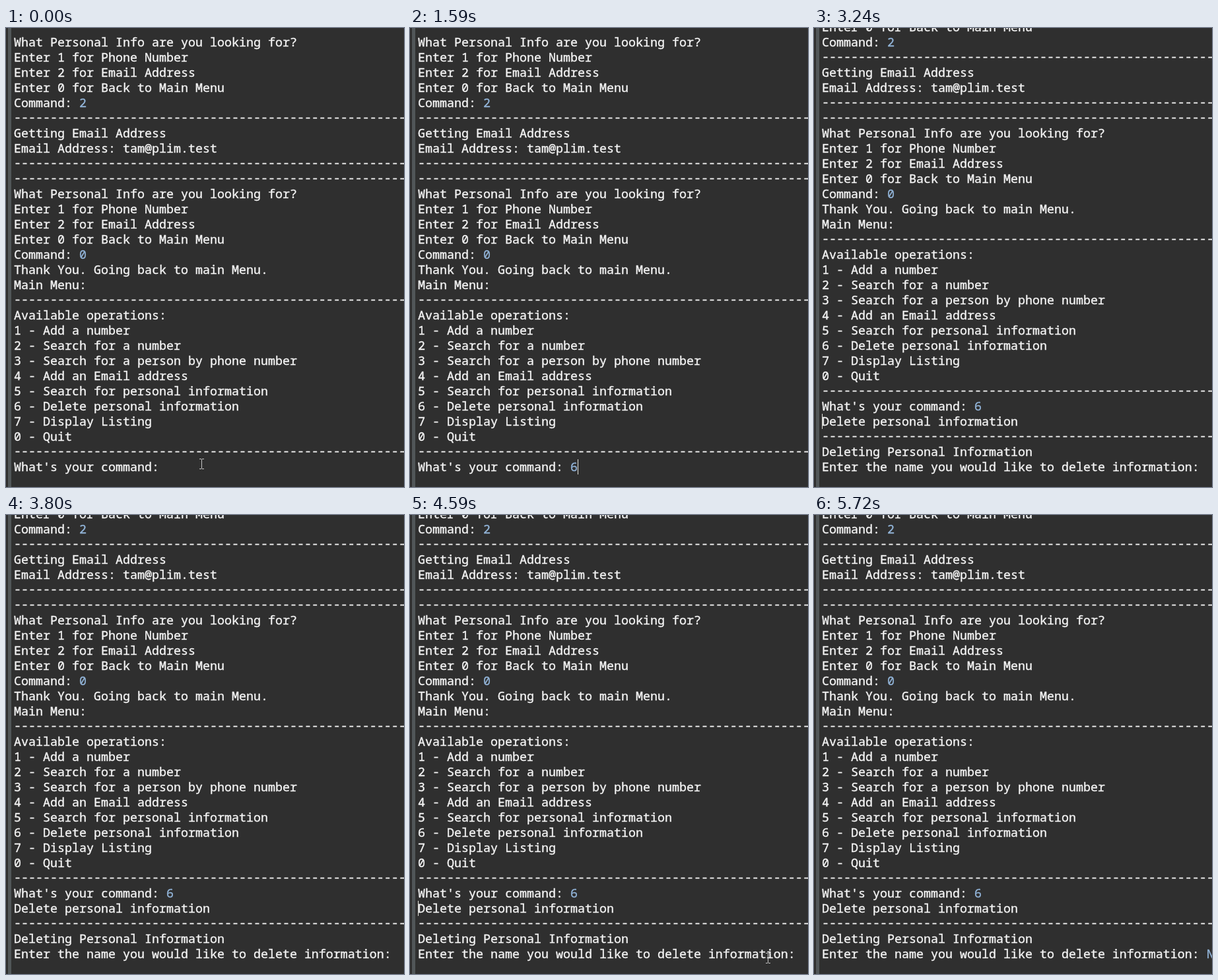
These frames come from a looping animation (603x696 px, 8000 ms). An HTML page with a canvas:

```html
<!DOCTYPE html>
<html lang="en">
<head>
<meta charset="utf-8">
<title>Console session</title>
<style>
  html, body { margin: 0; width: 603px; height: 696px; overflow: hidden; background: #2f2f2f; }
  canvas { display: block; }
</style>
</head>
<body>
<canvas id="stage" width="603" height="696"></canvas>
<script>
const LOOP = 8000, BLINK = 540, STEP = 120;
const TYPED = 510, REPLIED = 2160, POINTED = 4050, GLIDE = 4200, CLICKED = 4870, NAMED = 5720;

const LEFT = 12, TOP = 10, ROW = 23, CHAR = 11, BASELINE = 18, LAST_ROW = 28;
const TEXT = '#f4f4f4', INPUT = '#92b4d8', CARET = '#e4e4dc', POINTER = '#c4c4c4';
const RULE = '-'.repeat(56);
const COMMAND = 'What\'s your command: ';
const NAME = 'Enter the name you would like to delete information:';

const ctx = document.getElementById('stage').getContext('2d');

const infoMenu = answer => [
  'What Personal Info are you looking for?',
  'Enter 1 for Phone Number',
  'Enter 2 for Email Address',
  'Enter 0 for Back to Main Menu',
  ['Command: ', answer],
];

const operations = [
  'Add a number',
  'Search for a number',
  'Search for a person by phone number',
  'Add an Email address',
  'Search for personal information',
  'Delete personal information',
  'Display Listing',
  'Quit',
];

const history = [
  ...infoMenu('2'),
  RULE,
  'Getting Email Address',
  'Email Address: tam@plim.test',
  RULE,
  RULE,
  ...infoMenu('0'),
  'Thank You. Going back to main Menu.',
  'Main Menu:',
  RULE,
  'Available operations:',
  ...operations.map((name, i) => `${(i + 1) % operations.length} - ${name}`),
  RULE,
];

const reply = ['Delete personal information', RULE, 'Deleting Personal Information'];

const mix = (a, b, p) => a + (b - a) * p;
const smooth = p => p * p * (3 - 2 * p);

function print(text, x, y, color) {
  ctx.fillStyle = ctx.strokeStyle = color;
  ctx.fillText(text, x, y);
  ctx.strokeText(text, x, y);
}

function drawLine(line, row) {
  const [label, answer] = [].concat(line);
  const y = TOP + row * ROW + BASELINE - (label === RULE ? 1 : 0);
  print(label, LEFT, y, TEXT);
  if (answer) print(answer, LEFT + label.length * CHAR, y, INPUT);
}

function caretAt(t) {
  if (t >= NAMED) return null;
  if (t >= CLICKED) return { since: CLICKED, column: NAME.length, row: LAST_ROW };
  if (t >= REPLIED) return { since: REPLIED, column: 0, row: LAST_ROW - reply.length };
  if (t >= TYPED) return { since: TYPED, column: COMMAND.length + 1, row: LAST_ROW };
  return { since: TYPED / 2 - BLINK, column: COMMAND.length, row: LAST_ROW, };
}

function drawCaret(t) {
  const caret = t >= TYPED / 2 ? caretAt(t) : null;
  if (!caret) return;
  const beats = Math.floor((t - caret.since) / BLINK);
  if (t >= TYPED && beats % 2) return;
  ctx.fillStyle = CARET;
  ctx.fillRect(LEFT + caret.column * CHAR, TOP + caret.row * ROW, 1, ROW);
}

// The pointer rests, then glides to the prompt in visible steps.
function pointerAt(t) {
  if (t < GLIDE) return [293, 653];
  const p = smooth(Math.min(Math.floor((t - GLIDE) / STEP) / 4, 1));
  return [Math.round(mix(303, 583, p)), Math.round(mix(670, 663, p))];
}

function drawPointer(t) {
  if (t >= NAMED || (t >= TYPED && t < POINTED)) return;
  const [x, y] = pointerAt(t);
  ctx.fillStyle = POINTER;
  for (const edge of [y, y + 15]) {
    ctx.fillRect(x, edge, 3, 1);
    ctx.fillRect(x + 4, edge, 3, 1);
  }
  ctx.fillRect(x + 3, y + 1, 1, 14);
}

function draw(t) {
  ctx.fillStyle = '#2f2f2f';
  ctx.fillRect(0, 0, 603, 696);
  ctx.fillStyle = '#515658';
  ctx.fillRect(3, 0, 5, 696);

  const lines = [...history, [COMMAND, t >= TYPED ? '6' : '']];
  if (t >= REPLIED) lines.push(...reply, [NAME + ' ', t >= NAMED ? 'N' : '']);

  ctx.font = `${CHAR / 0.6}px "Noto Sans Mono", monospace`;
  ctx.lineWidth = 0.4;
  const firstRow = LAST_ROW + 1 - lines.length;
  lines.forEach((line, i) => drawLine(line, firstRow + i));

  drawCaret(t);
  drawPointer(t);
}

const start = performance.now();
function tick() {
  draw((performance.now() - start) % LOOP);
  requestAnimationFrame(tick);
}
tick();
</script>
</body>
</html>
```
